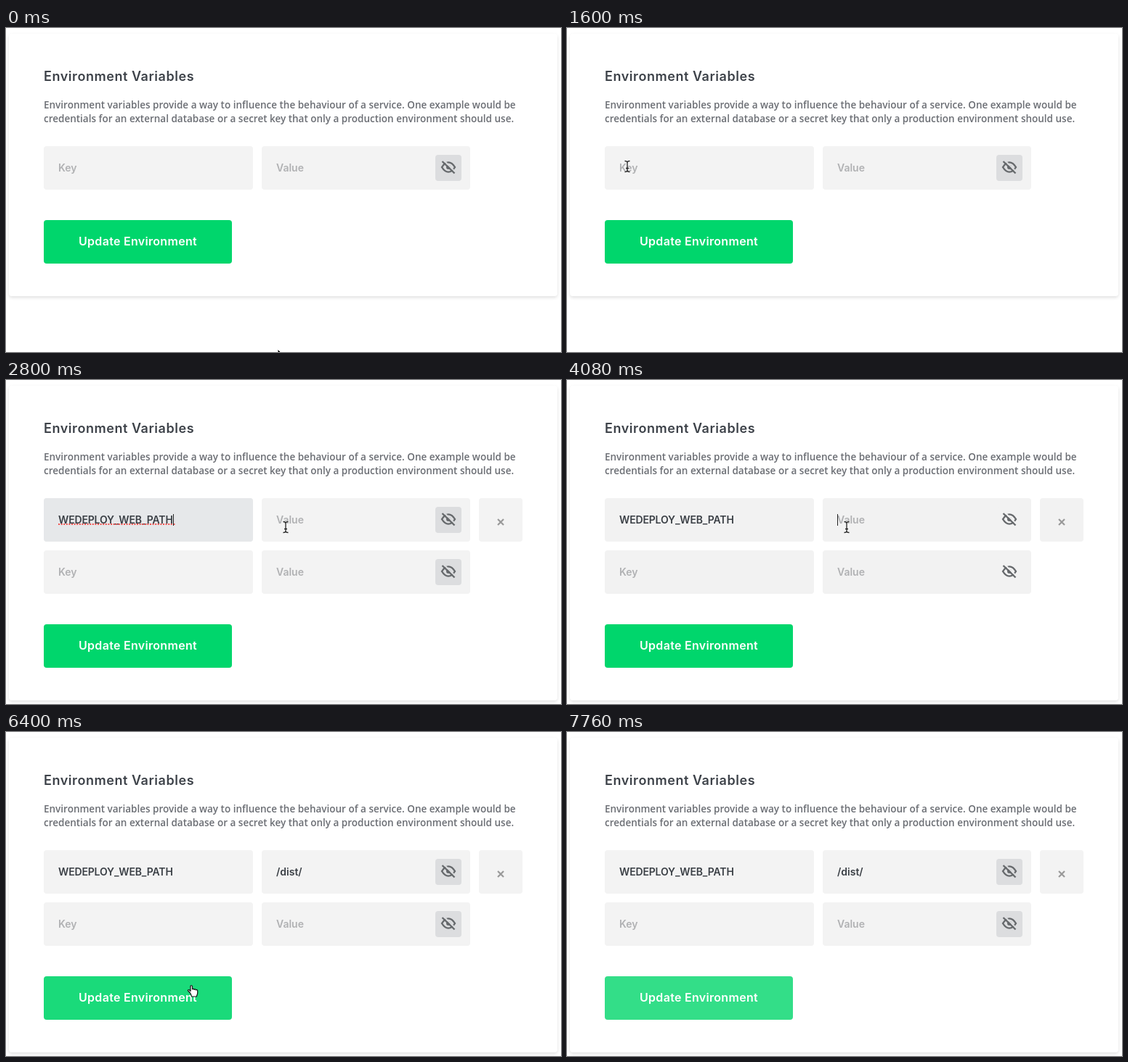
Recreate the animation shown at these times as an HTML page. Size 764 by 447 pixels, loop 8.88 s.

```html
<!DOCTYPE html>
<html lang="en">
<head>
<meta charset="utf-8">
<title>Environment Variables</title>
<style>
  html, body { margin: 0; width: 100%; height: 100%; overflow: hidden; background: #fff; }
  svg { display: block; --field: #f3f3f3; --eye: #dcdddf; }
  svg.flat { --field: #f2f2f2; --eye: #f2f2f2; }
  text { font: 600 14px Inter, sans-serif; fill: #3a3f45; white-space: pre; }
  .title { font-size: 18px; letter-spacing: .55px; fill: #3d4249; }
  .info { font: 600 13.5px "Open Sans", sans-serif; fill: #6b6e74; }
  .label { font-size: 16px; letter-spacing: .3px; fill: #fff; }
  .code { letter-spacing: -.15px; }
  .hint { fill: #b0b1b3; }
  .field { fill: var(--field); }
  .eye-box { fill: var(--eye); }
  #card { fill: #fff; filter: drop-shadow(0 2px 2px rgba(0, 0, 0, .12)); }
  #typo { stroke: #f0524f; stroke-width: 2; stroke-dasharray: 2 1.6; }
  #caret { fill: #222; }
</style>
</head>
<body>
<svg id="stage" width="764" height="447" viewBox="0 0 764 447">
  <defs>
    <g id="eye">
      <rect class="eye-box" x="-18" y="-17" width="36" height="36" rx="4"/>
      <g fill="none" stroke="#66696c" stroke-width="2.4">
        <path d="M-9 0Q-5 -6.6 0 -6.6T9 0Q5 6.6 0 6.6T-9 0Z"/>
        <circle r="3" fill="#66696c" stroke="none"/>
        <path d="M-6 -9L10 7" stroke="var(--eye)" stroke-width="2"/>
        <path d="M-8.5 -8L8.5 8.5"/>
      </g>
    </g>
    <g id="inputs">
      <rect class="field" x="52" y="163" width="288" height="60" rx="4"/>
      <rect class="field" x="352" y="163" width="287" height="60" rx="4"/>
      <use href="#eye" x="609" y="192"/>
    </g>
  </defs>

  <rect id="card" x="4" y="8" width="755" height="362" rx="4"/>
  <text class="title" x="52" y="73">Environment Variables</text>
  <text class="info" x="52" y="111">Environment variables provide a way to influence the behaviour of a service. One example would be</text>
  <text class="info" x="52" y="130">credentials for an external database or a secret key that only a production environment should use.</text>

  <use href="#inputs"/>
  <rect id="focus" x="52" y="163" width="288" height="60" rx="4" fill="#e6e8ea"/>
  <text id="keyHint" class="hint" x="72" y="198">Key</text>
  <text id="key" class="code" x="72" y="198">WEDEPLOY_WEB_PATH</text>
  <path id="typo" d="M72 199H233"/>
  <text id="valueHint" class="hint" x="372" y="198">Value</text>
  <text id="value" x="372" y="198"></text>

  <g id="extra">
    <rect class="field" x="651" y="163" width="60" height="60" rx="4"/>
    <path d="M677 192l8 8m0 -8l-8 8" stroke="#999" stroke-width="2.2"/>
    <use href="#inputs" y="72"/>
    <text class="hint" x="72" y="270">Key</text>
    <text class="hint" x="372" y="270">Value</text>
  </g>

  <g id="button">
    <rect id="face" x="52" y="265" width="259" height="60" rx="4"/>
    <text class="label" x="100" y="300">Update Environment</text>
  </g>

  <rect id="caret" y="185" width="1" height="16"/>
  <g id="cursor" stroke-linejoin="round">
    <path id="arrow" d="M0 0V15L3.6 11.7L6 17L8.4 16L6.1 10.8H10.8Z" fill="#000" stroke="#fff"/>
    <g id="beam" fill="none">
      <path d="M-3.5 -7.5Q0 -7.5 0 -5.5Q0 -7.5 3.5 -7.5M0 -5.5V5.5M-3.5 7.5Q0 7.5 0 5.5Q0 7.5 3.5 7.5M-2 2.5H2" stroke="#fff" stroke-width="2.6" opacity=".6"/>
      <path d="M-3.5 -7.5Q0 -7.5 0 -5.5Q0 -7.5 3.5 -7.5M0 -5.5V5.5M-3.5 7.5Q0 7.5 0 5.5Q0 7.5 3.5 7.5M-2 2.5H2" stroke="#222" stroke-width="1.3"/>
    </g>
    <path id="hand" transform="translate(-8 -8)" fill="#fff" stroke="#111" stroke-width="1.2"
      d="M4.5 11L2 8.5C.8 7.2 2 5.8 3.5 7L5 8.5V2C5 .3 7.5 .3 7.5 2V6C8 5 10 5.2 10 6.5C10.5 5.6 12.3 5.8 12.4 7C13 6.3 14.7 6.5 14.7 8V11C14.7 13 13.5 14 13.3 16H6.5C6.3 14 5.5 12.5 4.5 11Z"/>
  </g>
</svg>
<script>
  const LOOP = 8880, TICK = 80;
  const PASTE = 1840, CLICK = 3120, HOVER = 6320;
  const $ = id => document.getElementById(id);
  const show = (id, on) => $(id).style.display = on ? '' : 'none';
  const within = (t, ...spans) => spans.some(([a, b]) => t >= a && t < b);
  const ramp = (t, a, b) => Math.min(1, Math.max(0, (t - a) / (b - a)));

  // time, x, y, ease-out power
  const path = [
    [0, 374, 443], [480, 91, 191, 1.5], [560, 91, 191], [640, 88, 195], [800, 83, 191],
    [2160, 83, 191], [2560, 320, 212], [2800, 385, 203, 1.5],
    [5920, 385, 203], [6000, 373, 230], [6480, 249, 366, 1.5],
    [7360, 249, 366], [7760, 300, 470], [LOOP, 300, 470]
  ];
  // time at which each character of the value is typed
  const typed = [4560, 4800, 4880, 5120, 5200, 5520];

  function pointer(t) {
    const i = path.findIndex(p => p[0] > t);
    const [t0, x0, y0] = path[i - 1], [t1, x1, y1, power = 1] = path[i];
    const p = 1 - (1 - (t - t0) / (t1 - t0)) ** power;
    return [x0 + (x1 - x0) * p, y0 + (y1 - y0) * p];
  }

  function drawCursor(t) {
    const [x, y] = pointer(t).map(Math.round);
    const shape = t >= HOVER && y < 397 ? 'hand' : within(t, [640, 6240]) ? 'beam' : 'arrow';
    for (const id of ['arrow', 'beam', 'hand']) show(id, id === shape);
    $('cursor').setAttribute('transform', `translate(${x} ${y})`);
  }

  function drawCaret(t) {
    show('caret', within(t, [800, 1600], [PASTE, 2320], [2800, 3600], [4080, 6000], [6560, 6800])
      && !within(t, [4320, 4320]));
    const field = t < CLICK ? $('key') : $('value');
    const empty = t < PASTE || within(t, [CLICK, typed[0]]);
    const start = t < CLICK ? 72 : 372;
    $('caret').setAttribute('x', start + (empty ? 0 : Math.round(field.getComputedTextLength())));
  }

  function draw(now) {
    const t = Math.floor(now % LOOP / TICK) * TICK;
    const grown = t >= PASTE;

    $('stage').classList.toggle('flat', within(t, [3360, HOVER]));
    $('card').setAttribute('height', grown ? 434 : 362);
    $('button').setAttribute('transform', `translate(0 ${grown ? 72 : 0})`);
    show('extra', grown);
    show('key', grown);
    show('keyHint', !grown);
    show('typo', within(t, [PASTE, CLICK]));
    $('focus').style.opacity = grown ? 1 - ramp(t, 3200, 3360) : 0;

    const count = typed.filter(at => t >= at).length;
    $('value').textContent = '/dist/'.slice(0, count);
    show('valueHint', !count);

    const h = ramp(t, HOVER, 6480);
    $('face').setAttribute('fill', `rgb(${51 * h}, ${214 + 8 * h}, ${108 + 28 * h})`);

    drawCaret(t);
    drawCursor(t);
  }

  const start = performance.now();
  (function frame() {
    draw(performance.now() - start);
    requestAnimationFrame(frame);
  })();
</script>
</body>
</html>
```
